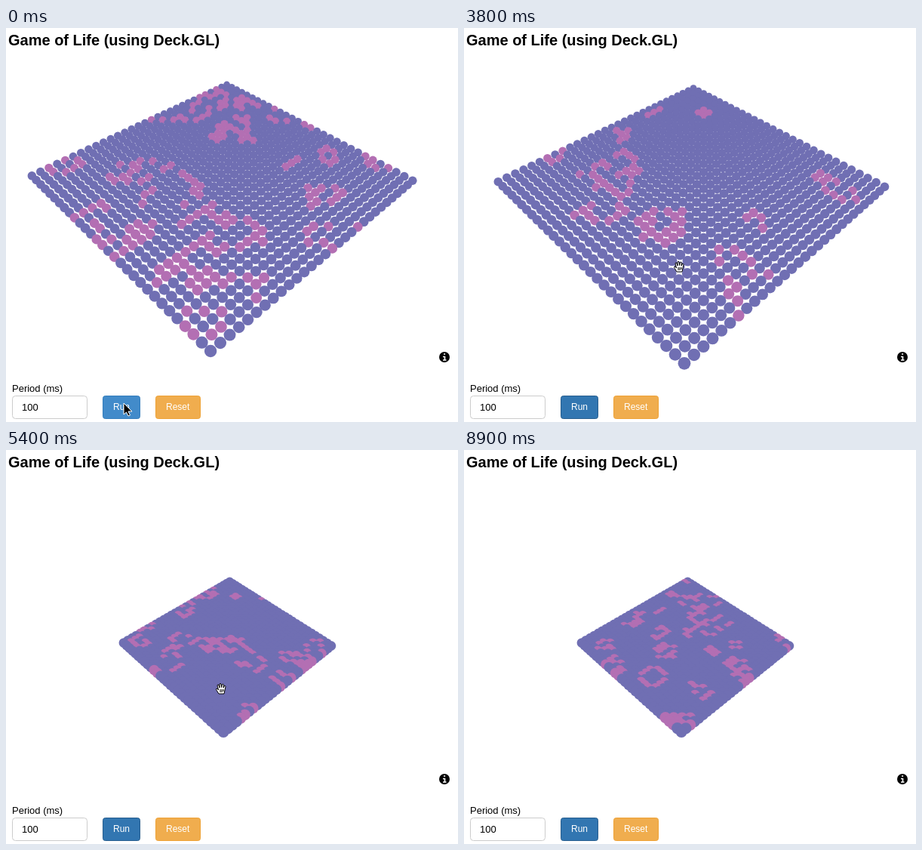
An HTML page with a canvas for the animation above (9000 ms loop, 599x522 px).

```html
<!DOCTYPE html>
<html>
<head>
<meta charset="utf-8">
<style>
  html, body { margin: 0; width: 100%; height: 100%; overflow: hidden; background: #fff; }
  canvas, svg { position: absolute; left: 0; top: 0; }
  text { font-family: "Liberation Sans", Arial, sans-serif; }
</style>
</head>
<body>
<canvas id="board" width="599" height="522"></canvas>
<svg width="599" height="522">
  <text x="3" y="23" font-size="20" font-weight="bold">Game of Life (using Deck.GL)</text>
  <circle cx="581" cy="436" r="7"/>
  <path d="M580 432h2.2M579 435.5h2.5v4.5M579 440h4.5" stroke="#fff" stroke-width="1.6" fill="none"/>
  <text x="8" y="482" font-size="13">Period (ms)</text>
  <rect x="8.5" y="487.5" width="99" height="30" rx="4" fill="#fff" stroke="#ccc"/>
  <text x="21" y="507" font-size="13">100</text>
  <rect id="run" x="128.5" y="487.5" width="49" height="30" rx="3"/>
  <text x="142" y="506" font-size="12" fill="#fff">Run</text>
  <rect id="reset" x="198.5" y="487.5" width="59" height="30" rx="3"/>
  <text x="212" y="506" font-size="12" fill="#fff">Reset</text>
  <g id="cursor">
    <g id="ring" fill="none">
      <circle r="28.5" stroke="#fff" stroke-width="6"/>
      <circle r="28.5" stroke="#000" stroke-width="3"/>
    </g>
    <path id="glyph" stroke-linejoin="round"/>
  </g>
</svg>
<script>
const N = 30, LOOP = 9000, STEP = 100;
const DRAG = 2300, DROP = 3700, RESET = 7500;
const HALF = 279.8;                     // half diagonal of the board before zooming
const TILT = Math.SQRT1_2, BEARING = 0.02, DISTANCE = 600;
const ANCHOR = { x: -14.6, y: 52.9 };   // ground point that zooming keeps in place
const $ = id => document.getElementById(id);
const ctx = $('board').getContext('2d');

const GLYPHS = {
  arrow: 'M0 0V15L3.5 12 6 17 8.5 16 6 11H11Z',
  open: 'M-3 7L-6.5 1.5Q-7-.5-4.5 .5L-3.5 2-5-4Q-4.5-6-3-4.5L-2-1-2-6Q-1-7.5 0-6L.5-1.5 1.5-5.5Q3-6.5 3.5-5L3-1 4.5-3.5Q6-4 6-2.5L4 7ZM-1 1V5M1 1V5M3 1V4',
  closed: 'M-3 7L-6.5 2Q-7-2-4.5-1.5V-4Q-2.5-6.5-1-4.5 1-6.5 2-4 4.5-5 5-2.5 7-2.5 6.5 0L4.5 7ZM-1 1V4M1 1V4M3 1V4',
  pointer: 'M-1.5 1Q0-1 1.5 1V7L3 6.5 5 7 7 8 8 9V12L6 17H-1L-5 11Q-6 8-3.5 9L-1.5 11ZM1 11V14M3 11V14M5 11V14'
};

const mix = (a, b, k) => a + (b - a) * k;
const ramp = (t, from, to) => Math.min(1, Math.max(0, (t - from) / (to - from)));
const ease = (t, from, to) => {
  const k = ramp(t, from, to);
  return k * k * (3 - 2 * k);
};

// The drag swings the board right, left and right again while it drifts
function pan(t) {
  const k = ramp(t, DRAG, DROP);
  return {
    x: mix(-17.7, -1.3, k) + 32 * Math.sin(3 * Math.PI * k ** 1.31),
    y: mix(-65.4, -55.7, Math.sqrt(k))
  };
}

function camera(t) {
  const p = pan(t);
  const zoom = Math.exp(0.248 * ease(t, 4300, 4700) - 0.958 * ease(t, 4900, 5400));
  return {
    x: mix(ANCHOR.x, p.x, zoom),
    y: mix(ANCHOR.y, p.y, zoom),
    half: HALF * zoom
  };
}

function project(cam, a, b) {
  const u = a / (N - 1) - 0.5, v = b / (N - 1) - 0.5;
  const gx = (u - v) * cam.half, gy = -(u + v) * cam.half;
  const x = cam.x + gx - BEARING * gy;
  const y = cam.y + (gy + BEARING * gx) * TILT;
  const w = 1 - y / DISTANCE;
  return { x: 301 + x / w, y: 258 + y / w, w };
}

let seed = 7;
function random() {
  seed = (seed * 1664525 + 1013904223) >>> 0;
  return seed / 2 ** 32;
}

const fill = rule => Array.from({ length: N * N }, (_, i) => rule(Math.floor(i / N), i % N, i));
const soup = () => fill(() => random() < 0.35);

// Life on a torus; a rare extra birth keeps the colonies active
function evolve(cells) {
  return fill((a, b, i) => {
    let n = 0;
    for (let da = -1; da <= 1; da++)
      for (let db = -1; db <= 1; db++)
        if ((da || db) && cells[(a + da + N) % N * N + (b + db + N) % N]) n++;
    return n === 3 || n === 2 && (cells[i] || random() < 0.01);
  });
}

let cells = soup();
for (let i = 0; i < 15; i++) cells = evolve(cells);
const boards = [cells];
for (let t = STEP; t < LOOP; t += STEP) {
  const paused = t > 500 && t < 900 || t === 1300;
  if (t === RESET) cells = soup();
  else if (!paused) cells = evolve(cells);
  boards.push(cells);
}

function drawBoard(t) {
  const cam = camera(t), board = boards[t / STEP];
  ctx.clearRect(0, 0, 599, 522);
  ctx.save();
  ctx.beginPath();
  ctx.rect(3, 58, 596, 400);
  ctx.clip();
  // Far corner first, so that nearer dots cover farther ones
  for (let a = N - 1; a >= 0; a--)
    for (let b = N - 1; b >= 0; b--) {
      const p = project(cam, a, b);
      ctx.fillStyle = board[a * N + b] ? '#b36fb3' : '#706fb3';
      ctx.beginPath();
      ctx.arc(p.x, p.y, 6.4 / p.w, 0, 7);
      ctx.fill();
    }
  ctx.restore();
}

// Where the mouse holds the ground during the drag
function grip(t) {
  const p = pan(t);
  return { x: 301 + (p.x - 4.1) / 0.912, y: 316 + (p.y + 59.6) * 1.1 };
}

// Each move ends at a place: [start, end, place]
const MOVES = [
  [1400, 2200, grip(DRAG)],
  [DROP, 3800, { x: 285, y: 316 }],
  [6400, 6900, { x: 227, y: 506 }],
  [7700, 8000, { x: 152, y: 500 }],
  [8200, 8500, { x: 215, y: 440 }]
];

function mouse(t) {
  if (t >= DRAG && t < DROP) return grip(t);
  let at = { x: 156, y: 497 };
  for (const [start, end, to] of MOVES) {
    if (t < start) break;
    const from = start === DROP ? grip(DROP) : at;
    const k = ease(t, start, end);
    at = { x: mix(from.x, to.x, k), y: mix(from.y, to.y, k) };
  }
  return at;
}

function paint(id, color, border) {
  $(id).setAttribute('fill', color);
  $(id).setAttribute('stroke', border);
}

function drawControls(t) {
  const { x, y } = mouse(t);
  const dragging = t >= DRAG && t < DROP;
  const onRun = y > 487 && x > 128 && x < 178;
  const onReset = y > 487 && x > 198 && x < 258;
  const kind = dragging ? 'closed' : y < 458 ? 'open' : (onRun || onReset) && t > 0 ? 'pointer' : 'arrow';
  const clicking = dragging || [100, 7400, 8000].some(c => t >= c && t < c + 200);

  $('cursor').setAttribute('transform', `translate(${x} ${y})`);
  $('cursor').style.display = t < 8500 ? '' : 'none';
  $('ring').style.display = clicking ? '' : 'none';
  $('glyph').setAttribute('d', GLYPHS[kind]);
  $('glyph').setAttribute('fill', kind === 'arrow' ? '#000' : '#fff');
  $('glyph').setAttribute('stroke', kind === 'arrow' ? '#fff' : '#000');

  if (t < 100) paint('run', '#428bca', '#357ebd');
  else paint('run', '#3276b1', '#285e8e');
  if (onReset) paint('reset', '#f0a238', '#e8962a');
  else paint('reset', '#f0ad4e', '#eea236');
}

let shown = -1;
function frame() {
  const t = Math.floor(performance.now() % LOOP / STEP) * STEP;
  if (t !== shown) {
    shown = t;
    drawBoard(t);
    drawControls(t);
  }
  requestAnimationFrame(frame);
}
frame();
</script>
</body>
</html>
```
